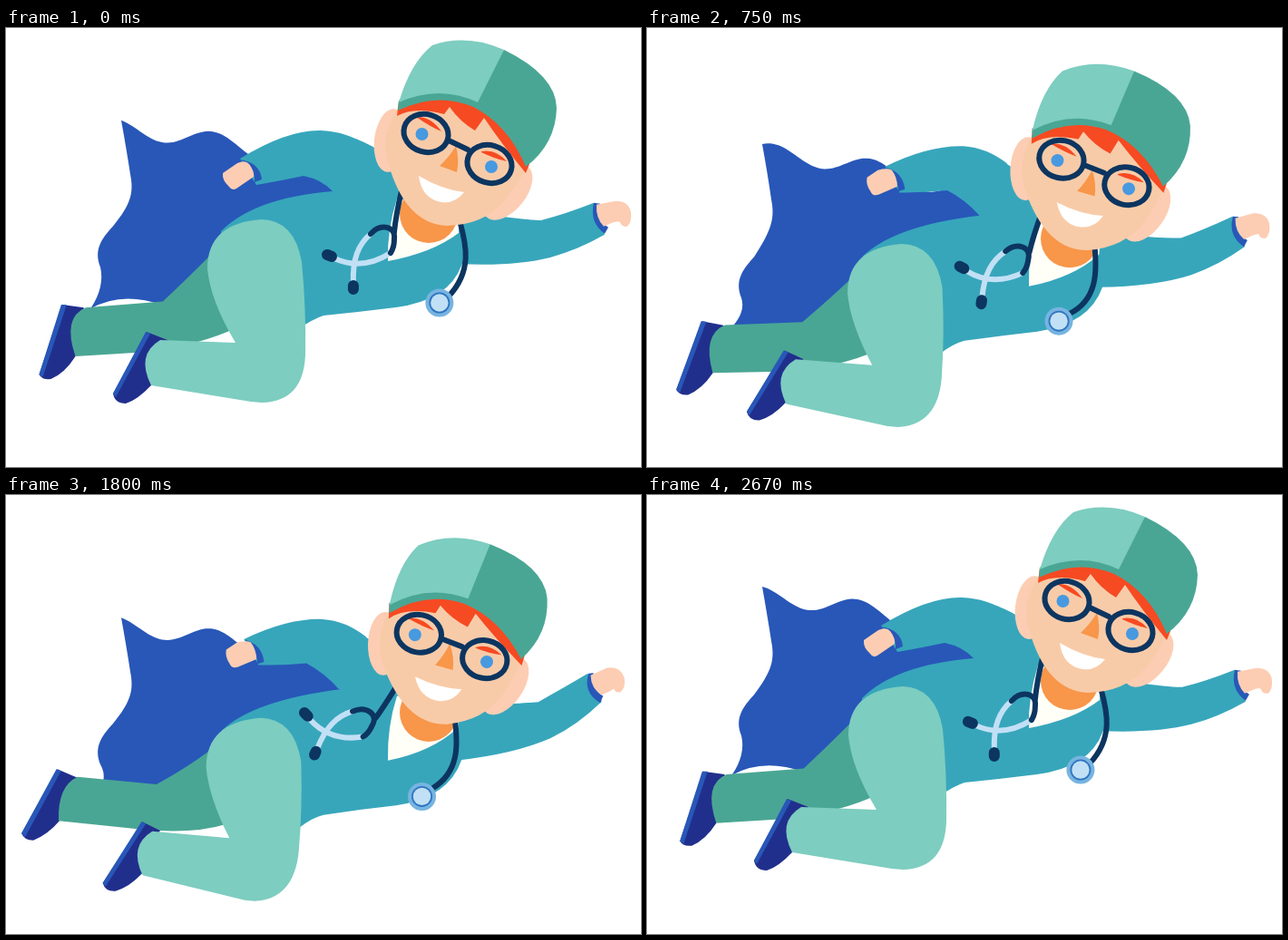
Write an HTML page with a canvas that moves like this. It is 700 px wide and 484 px high and loops after 2.7 s.

```html
<!DOCTYPE html>
<html lang="en">
<head>
<meta charset="utf-8">
<title>Flying doctor</title>
<style>
  html, body { margin: 0; width: 100%; height: 100%; overflow: hidden; background: #fff; }
  canvas { display: block; }
</style>
</head>
<body>
<canvas id="stage" width="700" height="484"></canvas>
<script>
const ctx = document.getElementById('stage').getContext('2d');
const LOOP = 2700, STEP = 30, TAU = Math.PI * 2, DROP = 44.5;
const C = {
  teal: '#37a6bb', cape: '#2857b8', shoe: '#212f8c', mint: '#7dcdc0', green: '#4aa694',
  skin: '#f8cba8', ear: '#fccdb3', neck: '#f8964a', hair: '#f64a22', navy: '#0c3560',
  tube: '#c2e0f5', disc: '#77b4e0', ring: '#2f76c0', eye: '#4799e0', cream: '#fffef7'
};

// Each limb is a path at the top and at the bottom of the flight.
const SHAPES = {
  torso: ['M385 122Q425 137 440 165L525 200L502 262Q488 300 430 308Q390 313 350 317Q338 321 322 332L235 270L237 224Q274 187 360 180Z',
          'M382 114Q405 125 430 150L525 200L502 258Q488 300 430 309Q390 313 350 320Q338 322 322 335L235 272L238 227Q272 195 371 181Z'],
  bentArm: ['M258 144Q310 112 347 113Q375 114 400 130L430 185L360 180Q348 167 328 163Q305 168 276 173Z',
            'M265 115Q310 97 350 98Q374 100 394 118L430 185L371 181Q352 160 333 146Q305 147 280 143Z'],
  bentCuff: ['M257 145Q280 148 282 167L274 170Q275 152 257 145Z',
             'M265 115Q283 120 286 141L279 143Q277 122 265 115Z'],
  bentHand: ['M239 160L255 149Q264 145 268 150Q274 158 273 164L254 177Q249 180 246 175Q238 168 239 160Z',
             'M245 124L254 118Q265 116 271 117Q277 125 278 138L257 144Q249 146 247 140Q243 132 245 124Z'],
  straightArm: ['M500 207L548 208Q580 212 590 212Q615 206 648 193L660 228Q630 245 600 253Q560 263 498 260Z',
                'M500 200L545 195Q575 192 586 191Q612 175 640 157L656 187Q630 215 600 231Q560 250 498 259Z'],
  straightCuff: ['M648 193L655 194Q653 214 664 220L660 227Q643 215 648 193Z',
                 'M641 157L646 156Q644 175 657 181L654 189Q634 178 641 157Z'],
  straightHand: ['M651 195L672 191Q687 191 689 204Q690 214 685 219Q678 220 677 214Q674 213 668 215L659 219Q650 210 651 195Z',
                 'M643 159L660 150Q675 147 680 160Q682 171 676 176Q670 178 669 173Q667 174 665 176L656 180Q644 174 643 159Z'],
  frontLeg: ['M222 265Q222 215 282 211Q318 212 326 258Q331 310 330 360Q328 412 282 413L270 412L160 394Q143 360 170 344L253 347Q225 300 222 265Z',
             'M220 268Q220 218 280 213Q318 214 325 262Q325 312 319 360Q312 412 270 415L260 414L146 382Q131 350 157 334L243 344Q223 300 220 268Z'],
  frontShoe: ['M155 335L118 403Q120 414 132 414Q145 410 160 394Q165 362 178 344Z',
              'M148 323L101 390Q104 399 115 398Q131 394 145 379Q152 350 166 333Z'],
  frontSole: ['M154 335L118 403L121 407L159 337Z', 'M147 323L101 390L104 394L152 325Z'],
  backLeg: ['M245 230Q215 262 173 302L88 309Q62 320 77 363L150 358Q215 350 255 330L260 250Z',
            'M245 232Q215 258 165 284L78 274Q56 284 56 322L150 333Q205 340 243 329L260 250Z'],
  backShoe: ['M62 306L37 383Q40 389 50 388Q65 382 77 363Q82 335 86 309Z',
             'M56 265L15 335Q18 343 28 343Q44 337 57 322Q66 292 78 275Z'],
  backSole: ['M61 306L37 383L41 386L67 306Z', 'M55 265L15 335L19 339L60 267Z'],
  collar: ['M431 188Q420 222 421 257Q470 248 499 226L500 200Z',
           'M431 188Q420 222 421 260Q470 250 498 222L500 200Z'],
  yokeTube: ['M428 225Q430 205 436 180', 'M402 209Q412 200 432 172'],
  chestTube: ['M500 212C508 240 514 268 488 296', 'M489 210C490 245 486 277 452 285']
};

const lerp = (a, b, w) => a + (b - a) * w;
const swing = (t, lag = 0) => (1 - Math.cos((t - lag) / LOOP * TAU)) / 2;
const ease = (t, lag) => swing(t, lag) ** 1.4;

function blend([a, b], w) {
  const end = b.match(/[\d.]+/g);
  let i = 0;
  return a.replace(/[\d.]+/g, n => lerp(+n, +end[i++], w).toFixed(2));
}
function fill(path, color) {
  ctx.fillStyle = color;
  ctx.fill(new Path2D(path));
}
function line(path, color, width) {
  ctx.strokeStyle = color;
  ctx.lineWidth = width;
  ctx.stroke(new Path2D(path));
}
function oval(x, y, rx, ry, angle, color) {
  ctx.beginPath();
  ctx.ellipse(x, y, rx, ry, angle, 0, TAU);
  ctx.fillStyle = color;
  ctx.fill();
}
const dot = (x, y, r, color) => oval(x, y, r, r, 0, color);
const limb = (name, w, color) => fill(blend(SHAPES[name], w), color);

function cape(t, p, leg) {
  const phase = t / 900;
  const sway = shift => Math.cos(TAU * (phase - shift));
  const edge = x => {
    const d = x - 127;
    return 111 + 0.075 * d + 0.0006 * d * d - 10.5 * Math.cos(TAU * ((x - 229) / 111 + phase));
  };
  const cornerX = lerp(88, 104, leg) - 5 * sway(0.5), cornerY = lerp(310, 279, leg);
  const low = 254 + 8 * sway(0.7), high = 183 + 7 * sway(0.45);
  const hemX = lerp(173, 165, leg), hemY = lerp(303, 285, leg);
  let path = `M${cornerX} ${cornerY}Q109 ${(cornerY + low) / 2 + 5} 104 ${low + 12}`
    + `C97 ${low - 6} 104 ${low - 18} 118 ${low - 33}C138 ${high + 18} 141 ${high + 5} 137 ${high - 15}`
    + `Q133 135 127 ${edge(127)}`;
  for (let x = 130; x <= 370; x += 3) path += `L${x} ${edge(x)}`;
  path += `L370 183L300 230L245 262L${hemX} ${hemY + 3}`
    + `Q128 ${hemY + 8 - 21 * (1 - p) ** 4} ${cornerX} ${cornerY}Z`;
  fill(path, C.cape);
}

function stethoscope(w, chest) {
  line(blend(SHAPES.yokeTube, w), C.navy, 6);
  ctx.save();
  ctx.translate(lerp(428, 402, w), lerp(223, 209, w));
  ctx.rotate(w * 0.53);
  line('M-66 31Q-35 45 -4 25M-45 58C-46 32 -40 16 -26 4', C.tube, 6);
  line('M-26 4C-15 -8 2 -5 0 10Q0 19 -4 25', C.navy, 6);
  line('M-74 27L-69 29M-45 61L-45 65', C.navy, 12);
  ctx.restore();

  line(blend(SHAPES.chestTube, chest), C.navy, 6);
  const x = lerp(478, 440, chest), y = lerp(303, 288, chest * chest);
  dot(x, y, 15.5, C.disc);
  dot(x, y, 11.5, C.ring);
  dot(x, y, 9.7, C.tube);
}

function lens(x, y) {
  ctx.beginPath();
  ctx.ellipse(x, y, 24.8, 20.8, 0.28, 0, TAU);
  ctx.strokeStyle = C.navy;
  ctx.lineWidth = 6;
  ctx.stroke();
}

function head(p) {
  ctx.save();
  ctx.translate(502, 215);
  ctx.rotate(-0.106 * p);
  ctx.translate(-502, -215);
  oval(424, 124, 18, 35, 0.12, C.ear);
  oval(553, 181, 20, 36, 0.68, C.ear);
  fill('M434 85Q412 118 421 148Q440 216 486 218Q527 217 549 191Q564 173 573 155L560 100L520 70Z', C.skin);
  fill('M431 97Q450 86 483 95L489 87Q500 103 517 113L527 99Q545 126 573 160L577 150L560 100L520 78L433 80Z', C.hair);
  fill('M452 98Q468 97 480 114Q468 109 452 98Z', C.hair);
  fill('M524 136Q540 133 552 147Q538 144 524 137Z', C.hair);
  dot(458.5, 117, 7, C.eye);
  dot(535, 153, 7, C.eye);
  fill('M496 130Q488 143 478 152L497 159Q500 145 496 130Z', C.neck);
  fill('M455 163Q480 178 505 181Q495 194 480 192Q458 188 455 163Z', '#fff');
  lens(463, 116);
  lens(533, 150);
  line('M488 124L509 134', C.navy, 6);
  fill('M433 80L432 91Q475 70 515 87Q553 106 573 153Q606 128 607 88Q606 52 549 24L515 70Q478 52 433 80Z', C.green);
  fill('M433 82Q446 38 470 19Q508 6 549 24L520 82Q478 62 433 82Z', C.mint);
  ctx.restore();
}

function draw(t) {
  const p = swing(t), bend = ease(t, 0), fold = 1.07 * ease(t, -60);
  const reach = ease(t, 130), leg = ease(t, 220), chest = ease(t, -120);
  ctx.fillStyle = '#fff';
  ctx.fillRect(0, 0, 700, 484);
  ctx.lineCap = 'round';
  ctx.save();
  ctx.translate(0, DROP * p);

  cape(t, p, leg);
  limb('backShoe', leg, C.shoe);
  limb('backSole', leg, C.cape);
  limb('backLeg', leg, C.green);

  limb('straightArm', reach, C.teal);
  limb('straightCuff', reach, C.cape);
  limb('straightHand', reach, C.ear);
  limb('torso', p, C.teal);
  limb('bentArm', fold, C.teal);
  limb('bentCuff', fold, C.cape);
  limb('bentHand', fold, C.ear);

  limb('frontShoe', bend, C.shoe);
  limb('frontSole', bend, C.cape);
  limb('frontLeg', bend, C.mint);

  limb('collar', p, C.cream);
  dot(466, 205 + 2 * p, 32, C.neck);
  stethoscope(reach ** 1.2, chest);
  head(p);
  ctx.restore();
}

const start = performance.now();
function tick() {
  const t = (performance.now() - start) % LOOP;
  draw(Math.floor(t / STEP) * STEP);
  requestAnimationFrame(tick);
}
tick();
</script>
</body>
</html>
```
